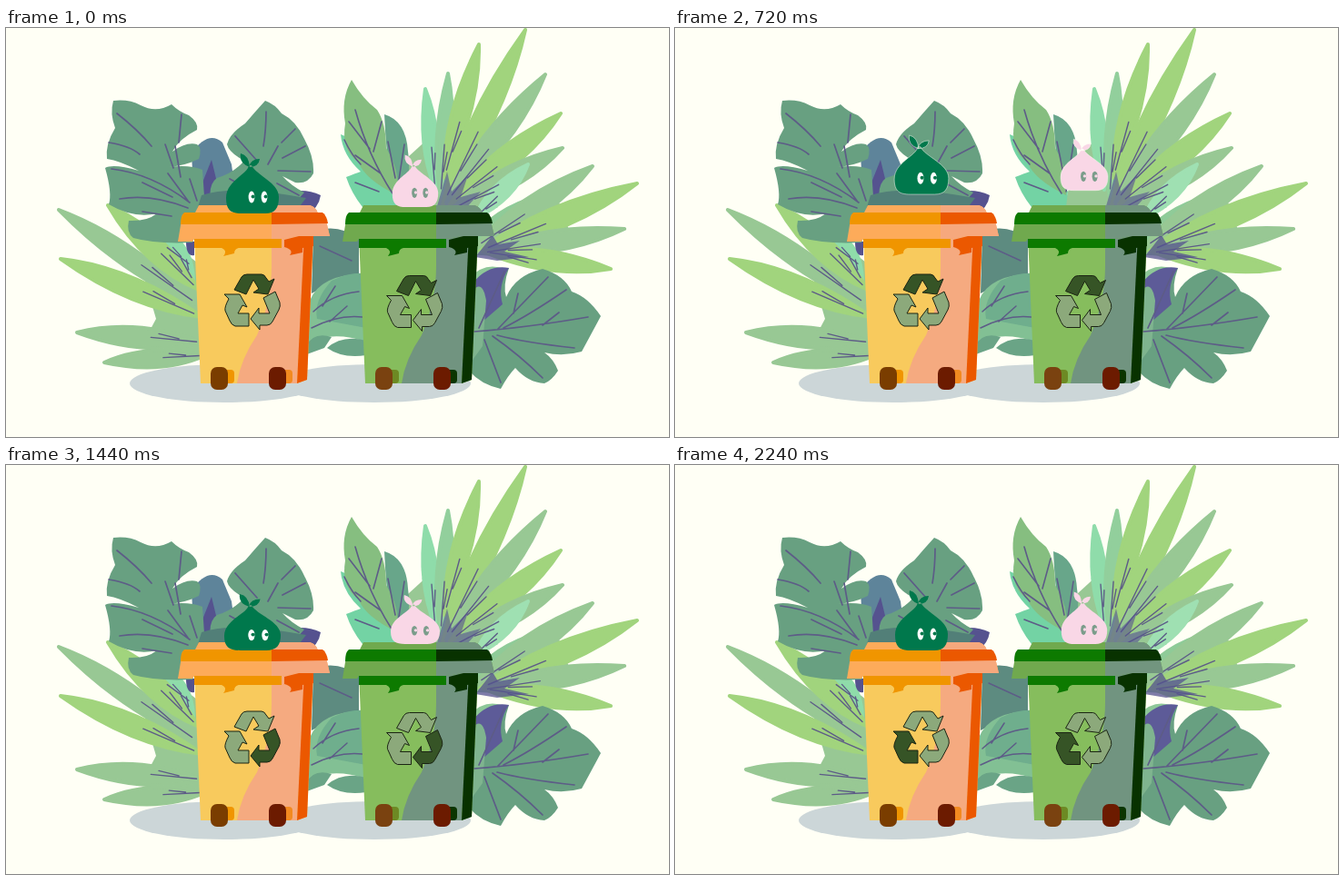
An HTML page for the animation above (2800 ms loop, 729 by 450 pixels).

```html
<!DOCTYPE html>
<html lang="en">
<head>
<meta charset="utf-8">
<title>Recycling bins</title>
<style>
  html, body { margin: 0; width: 100%; height: 100%; overflow: hidden; background: #fffff5; }
  svg { display: block; }
</style>
</head>
<body>
<svg id="stage" width="729" height="450" viewBox="0 0 729 450"></svg>
<script>
const LOOP = 2800, STEP = 80;
const LIGHT = '#a1d47d', SAGE = '#98c894', MINT = '#8fdcaa';
const LEAF = '#68a081', TEAL = '#5d8b80', VEIN = '#5d5c87', VIOLET = '#55528f';

const path = (d, fill, extra = '') => `<path d="${d}" fill="${fill}" ${extra}/>`;
const line = (d, width = 2, color = VEIN) =>
  path(d, 'none', `stroke="${color}" stroke-width="${width}" stroke-linecap="round"`);

// Returns points along a blade: k from base to tip, side across its width
function along([x, y, tx, ty, w]) {
  const len = Math.hypot(tx - x, ty - y), nx = (y - ty) / len * w, ny = (tx - x) / len * w;
  return (k, side) => `${(x + (tx - x) * k + nx * side).toFixed(1)} ${(y + (ty - y) * k + ny * side).toFixed(1)}`;
}

function blade(b) {
  const at = along(b), base = at(0, 0), tip = at(1, 0);
  return path(`M${base}Q${at(.55, 1.15)} ${tip}Q${at(.45, -1.15)} ${base}Z`, b[5],
    `stroke="${b[5]}" stroke-width="4" stroke-linejoin="round"`);
}

function streaks(b) {
  const at = along(b);
  return line(`M${at(.06, 0)}L${at(.42, .05)}M${at(.2, .1)}L${at(.36, .3)}`, 1.4);
}

const fan = blades => blades.map(blade).join('') + blades.map(streaks).join('');

const leftFan = [
  [205, 262, 138, 215, 15, SAGE], [206, 278, 172, 222, 18, MINT], [214, 306, 58, 200, 18, SAGE],
  [212, 288, 112, 195, 20, LIGHT], [216, 318, 60, 254, 19, LIGHT],
  [218, 346, 78, 335, 19, SAGE], [220, 360, 108, 368, 16, SAGE]
];
const upperFan = [
  [472, 178, 461, 67, 13, MINT], [478, 185, 486, 50, 14, '#92cf9c'], [482, 165, 520, 18, 17, LIGHT],
  [480, 195, 571, 2, 19, LIGHT], [484, 192, 593, 51, 20, SAGE], [488, 194, 610, 94, 20, LIGHT],
  [490, 200, 612, 132, 19, SAGE], [515, 210, 574, 150, 15, '#9fe0b2']
];
const lowerFan = [
  [515, 242, 645, 152, 20, SAGE], [520, 246, 694, 171, 20, LIGHT],
  [520, 248, 680, 221, 19, SAGE], [524, 246, 665, 265, 18, LIGHT]
];

const foliage = () => [
  path('M150 268L200 250 215 262V362L150 348 165 320Z', SAGE),
  fan(leftFan),
  path('M204 138Q222 112 238 126L248 150 254 196H207Z', '#5e849a'),
  path('M208 190L226 145 238 195ZM300 184Q325 174 346 184Q344 198 330 206H290Z', VIOLET),
  path('M198 235H207V250Q198 252 198 235Z', VIOLET),
  path(`M118 80Q135 78 148 85Q165 94 182 84Q190 92 201 96Q212 104 210 112Q190 122 183 136
    Q198 125 210 128Q216 132 212 144Q196 152 178 153Q202 150 216 156L219 200 205 236
    Q165 238 140 231Q132 225 135 212Q155 213 166 204Q140 210 113 194Q117 182 109 154
    Q118 149 146 157Q125 146 111 144Q109 128 120 110Q114 94 118 80Z`, LEAF),
  path(`M285 80Q296 84 303 94Q319 102 328 122Q339 142 338 160Q332 172 318 170L304 163
    Q314 174 328 181L318 192H225Q222 172 232 165Q250 160 262 146Q245 137 243 128
    Q246 116 263 105Q274 92 285 80Z`, LEAF),
  path('M215 184Q250 172 330 187L320 200H210Z', '#527f78'),
  line('M122 94Q145 112 160 130M178 160L200 190M113 126Q137 130 147 139M116 155Q160 160 202 192M193 95L190 126M175 128L184 154M186 130L192 164M202 166L210 190M150 170L183 186M125 188Q160 182 200 198M150 202L182 207', 1.7),
  line('M286 92Q286 112 283 130M252 119L276 146M303 126L318 111M299 130L288 150M329 130L304 143M335 158L299 157M246 166L264 176M322 184L298 171', 1.7),

  path('M338 224Q365 214 388 232V270Q362 278 336 292Z', TEAL),
  path('M334 300Q345 271 396 270V345Q355 332 330 349Z', '#82c094'),
  path('M330 350Q338 334 358 340L350 352 328 360ZM353 352Q370 337 396 344V360Q370 364 353 352Z', '#6aa486'),
  path('M358 278Q378 268 396 270V330L342 320Q338 300 358 278Z', '#6fae8d'),
  line('M338 312Q358 293 388 290M336 330Q365 315 392 318M345 240L380 256M348 306L362 284M356 323L375 306', 1.5),

  path('M428 196L442 142 466 120 486 110 520 112 548 122 560 160 540 198Z', SAGE),
  path('M368 117Q400 128 432 180L430 197H392Q380 182 374 164Q384 160 390 158Q370 140 368 117Z', '#73d3a4'),
  path('M416 95Q440 102 442 136Q446 164 437 178H424Q418 140 416 95Z', '#68a68a'),
  path('M380 57Q392 78 408 90Q418 105 418 132Q434 158 430 184Q394 166 388 148Q368 135 373 105Q368 78 380 57Z', '#86be80'),
  line('M384 90Q398 140 425 182M377 103L400 133M413 103L404 136M384 140L412 160M372 123Q380 140 390 150M420 125L428 165M438 128L430 180M384 170L410 180', 1.6),
  fan(upperFan),
  path('M474 196L485 158 490 180 508 162 500 186 522 180 506 198Z', VIOLET, 'opacity=".6"'),

  path('M512 228Q545 190 600 180Q585 215 520 250Z', '#8fcb98'),
  path('M514 250L560 196 606 186 620 225 600 250Z', SAGE),
  fan(lowerFan),
  path('M516 252L535 228 541 238 565 234 548 246 575 252 540 256Z', VIOLET, 'opacity=".75"'),
  path('M510 275Q525 258 545 264V360L511 376Z', '#8dc797'),
  path(`M512 300Q520 262 553 264Q546 284 550 296Q560 272 590 265Q614 272 622 290Q640 296 654 317
    Q646 332 633 356Q612 362 592 357Q602 364 607 377Q600 388 592 391Q574 390 560 374
    Q552 382 544 397Q522 392 510 378Z`, LEAF),
  path('M514 280Q530 260 553 264Q540 284 546 304L516 330Z', '#5d5b98'),
  path('M512 290Q524 275 528 300L524 350 511 368Z', '#7fb48f'),
  line('M515 334Q570 330 640 318M541 331L596 274M547 330Q575 316 616 288M540 338Q570 346 625 352M535 339Q565 360 590 385M526 343L544 390M548 268L520 330M563 292L558 314M590 327L608 313', 1.7)
].join('');

const arrows = [
  'M251 288L259 274Q261 271 265 271H281Q284 271 286 275L289 279 295 276 288 293 272 291 278 287 272 277 264 293Z',
  'M283 297L296 290 301 302Q302 306 300 310L293 323Q291 327 287 327H279V332L269 320 278 308V314H290Z',
  'M240 293H257L265 307 260 305 255 314H267V328H252Q248 327 246 322L241 311Q240 307 245 298Z'
];

function bin(dx, c) {
  const wheel = (x, color, glow) =>
    `<rect x="${x + 8}" y="376" width="18" height="15" rx="4" fill="${glow}"/>
     <rect x="${x}" y="373" width="19" height="25" rx="7" fill="${color}"/>`;
  return `<g transform="translate(${dx})">` + [
    path('M207 228L214 391H320L331 387 338 226Z', c.body),
    path('M292 228V262Q292 300 276 338Q258 364 254 391H320L329 228Z', c.shade),
    path('M328 226H338L331 387 320 391Z', c.edge),
    path('M212 195H334Q341 197 343 204H350L356 229H320L303 232H207L205 235H189L194 205H207Z', c.lid),
    path('M292 195H334Q341 197 343 204H350L356 229H320L303 232H292Z', c.lidShade),
    path('M196 203H292V216H192Q192 206 196 203Z', c.band),
    path('M292 203H348Q353 207 354 215L292 216Z', c.edge),
    path('M207 232H303V242H256Q251 243 251 248L239 251Q244 245 237 242H207Z', c.band),
    path('M306 233L322 229H338V240L326 242V247L312 250Q317 244 306 241Z', c.edge),
    wheel(225, c.wheel, c.glow), wheel(289, '#6c1b00', c.glowShade)
  ].join('') + `</g><g transform="translate(${dx && 178.5} ${dx && 1.5})" stroke="#1b2413" stroke-linejoin="round">` +
    arrows.map((d, i) => `<path class="arrow${i}" d="${d}"/>`).join('') + '</g>';
}

const mascot = (color, eye) => `<g class="mascot" fill="${color}">
  <path stroke-width=".7" d="M-3-51Q-4-64-13-66Q-15-55-3-51ZM-4-51Q-2-60 8-60Q7-51-4-51Z
    M-4-53C-5-43-29-36-29-17C-29-3-23 0-12 0H14C25 0 29-6 29-18C29-34 4-42-1-53Z"/>
  ${[-1, 13].map(x => `<ellipse cx="${x}" cy="-18" rx="3.4" ry="6.5" fill="${eye}"/>
    <circle cx="${x + 1.6}" cy="-18.5" r="2"/>`).join('')}
</g>`;

const stage = document.getElementById('stage');
stage.innerHTML = `<g fill="#ccd6d8"><ellipse cx="240" cy="391" rx="104" ry="21"/>
  <ellipse cx="405" cy="391" rx="106" ry="21"/></g>` + foliage() +
  bin(0, { body: '#f8ca5d', shade: '#f5aa80', edge: '#eb5800', lid: '#fdab5a', lidShade: '#f6a87d',
    band: '#f09500', wheel: '#7a3d00', glow: '#f09500', glowShade: '#f28a20' }) +
  bin(181, { body: '#86bd5d', shade: '#719480', edge: '#083200', lid: '#70a94e', lidShade: '#72957f',
    band: '#0d7a00', wheel: '#7a4210', glow: '#6d8a24', glowShade: '#0b3500' }) +
  mascot('#00784c', '#fff') + mascot('#f9d7e6', '#7b9d8b');

const mascots = [...stage.querySelectorAll('.mascot')];
const places = [[271, 204, 1], [450, 197, .87]];

// time, lift, width, height
const poses = [
  [0, 0, 1, 1], [80, 0, 1, 1], [320, 0, 1.07, .88], [480, 2, .95, 1.08], [720, 21, 1.03, .985],
  [1120, 0, .95, 1.1], [1440, 0, 1.07, .94], [1920, 0, 1, 1], [LOOP, 0, 1, 1]
];

function poseAt(t) {
  const i = poses.findIndex(p => p[0] > t), a = poses[i - 1], b = poses[i];
  const k = (t - a[0]) / (b[0] - a[0]), ease = k * k * (3 - 2 * k);
  return a.map((v, j) => v + (b[j] - v) * ease);
}

function draw() {
  const t = Math.floor(performance.now() % LOOP / STEP) * STEP;
  const [, lift, sx, sy] = poseAt(t);
  mascots.forEach((m, i) => {
    const [x, y, s] = places[i];
    m.setAttribute('transform', `translate(${x} ${y - lift * s}) scale(${sx * s} ${sy * s})`);
    m.firstElementChild.setAttribute('stroke', t > 0 && t < 1200 ? '#fffff5b0' : 'none');
  });
  const active = Math.floor(t / LOOP * 3);
  arrows.forEach((_, i) => stage.querySelectorAll('.arrow' + i).forEach(a =>
    a.setAttribute('fill', i === active ? '#365426' : '#8ca97b')));
  requestAnimationFrame(draw);
}
draw();
</script>
</body>
</html>
```
